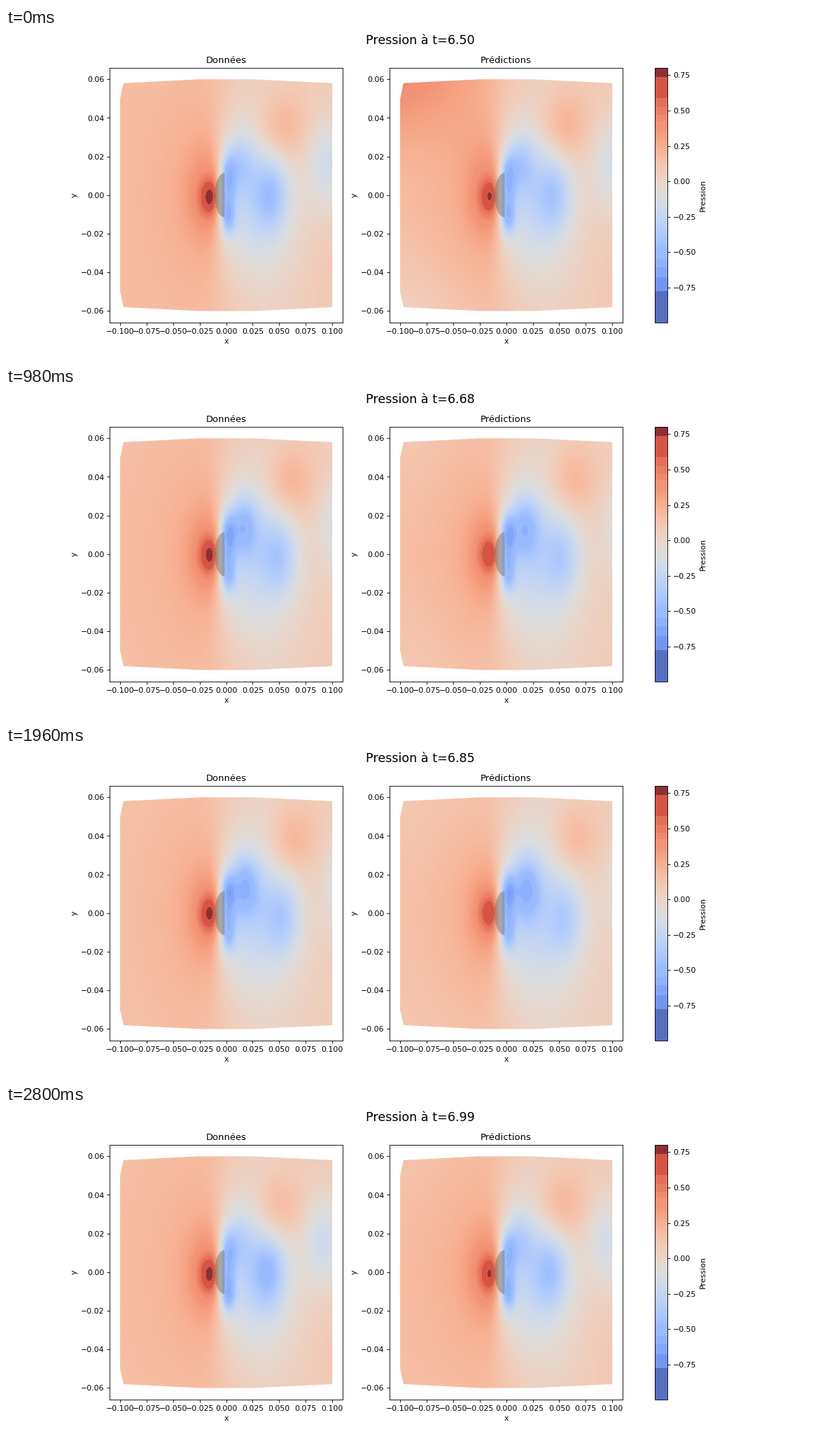
Recreate the animation shown at these times as a matplotlib script. Size 1183 by 473 pixels, loop 2940 ms.

```python
import numpy as np
import matplotlib.pyplot as plt
from matplotlib.animation import FuncAnimation
from matplotlib.colors import ListedColormap
from matplotlib.patches import Polygon

FRAMES, STEP_MS = 21, 140
DPI = 78.87
PERIOD = 0.165                      # vortex shedding period
VMIN, VMAX = -0.997, 0.802
XLIM, YLIM = 0.11, 0.066

gx = (np.arange(333) + 0.5) / 333 * 2 * XLIM - XLIM
gy = (np.arange(364) + 0.5) / 364 * 2 * YLIM - YLIM
X, Y = np.meshgrid(gx, gy)


def gauss(x, y, sx, sy):
    return np.exp(-0.5 * (((X - x) / sx) ** 2 + ((Y - y) / sy) ** 2))


def smooth(u):
    u = np.clip(u, 0, 1)
    return u * u * (3 - 2 * u)


def bump(u, centre, width):
    return np.exp(-((u - centre) / width) ** 2)


def wave(u):
    return np.cos(2 * np.pi * u)


# Steady parts of the flow; BEHIND switches from the front to the wake side
BEHIND = 1 / (1 + np.exp(-(X + 0.008) / (0.0018 + 0.09 * np.abs(Y))))
AMBIENT = 0.13 - 0.06 * smooth((X + 0.01) / 0.06)
HALO = 0.20 * gauss(-0.015, 0, 0.016, 0.017) + 0.09 * gauss(-0.02, 0, 0.04, 0.04)
WAKE = (0.26 * gauss(0.020, 0, 0.028, 0.026) + 0.12 * gauss(0.027, 0, 0.041, 0.06)
        + 0.30 * gauss(0.001, 0, 0.005, 0.010))
INLET = np.clip(-X / 0.1, 0, 1)


def vortex(age, side):
    """Low-pressure core: rolls up at the edge, crosses the axis, drifts away."""
    x = 0.011 + 0.04 * age + 0.045 * age ** 2
    y = side * (0.008 + 0.008 * wave(age))
    depth = 0.25 * smooth((age + 0.25) / 0.35) + 0.22 * bump(age, 0.24, 0.17)
    grow = max(age, 0)
    return depth * gauss(x, y, 0.010 + 0.003 * grow, 0.0105 + 0.006 * grow)


def ridge(age, side):
    """High-pressure patch riding outside the vortex street."""
    x = 0.051 + 0.085 * age
    y = side * (0.040 - 0.006 * np.exp(-6 * age))
    return 0.23 * bump(age, 0.03, 0.27) * gauss(x, y, 0.016, 0.013)


def pressure(phase, nose=0.37, gain=1.0):
    ambient = AMBIENT + 0.035 * wave(2 * (phase - 0.03))
    tip = -0.0015 * wave(phase - 0.9)
    front = HALO + nose * gauss(-0.0142, tip, 0.0075, 0.0065)
    wake = -WAKE
    for side in (1, -1):
        start = (phase - (side < 0) * 0.5) % 1
        shear = 0.25 + 0.12 * wave(start - 0.35)
        wake = wake - shear * gauss(0.001, side * 0.0125, 0.0048, 0.006)
        for age in (start - 1, start, start + 1):
            wake = wake - gain * vortex(age, side) + ridge(age, side)
    return ambient + front * (1 - BEHIND) + wake * BEHIND


def prediction(k, phase):
    """Slightly early and weaker, with an inlet error that dies out."""
    top = 0.34 * np.exp(-k) - 0.04
    bottom = -0.15 * np.exp(-k / 8) * wave(phase)
    up, down = np.clip(Y / 0.06, 0, 1), np.clip(-Y / 0.06, 0, 1)
    corner = INLET * (top * up ** 1.5 + bottom * down ** 1.5)
    return pressure(phase + 0.03, nose=0.32, gain=0.92) + corner


def stepped_coolwarm():
    """Coolwarm, smooth in the middle and stepped towards both ends."""
    v = np.linspace(VMIN, VMAX, 360)
    shown = v.copy()
    cold = [-0.78, -0.68, -0.61, -0.55, -0.49]
    warm = [0.38, 0.43, 0.475, 0.525, 0.59, 0.74]
    for edges in (cold, warm):
        for a, b in zip(edges, edges[1:]):
            shown[(v >= a) & (v < b)] = 0.93 * (a + b) / 2
    rgba = plt.cm.coolwarm((shown - VMIN) / (VMAX - VMIN))
    rgba[v < cold[0], :3] = 0.34, 0.435, 0.755
    rgba[v >= warm[-1], :3] = 0.55, 0.19, 0.21
    return ListedColormap(rgba)


plt.rcParams["font.family"] = "DejaVu Sans"
fig, axes = plt.subplots(1, 2, figsize=(1183.01 / DPI, 473.01 / DPI), dpi=DPI)
title = fig.suptitle("", fontsize=16)

half = [(-0.1, 0.05), (-0.0968, 0.058), (-0.025, 0.06), (0.025, 0.06), (0.1, 0.058)]
domain = half + [(x, -y) for x, y in half[::-1]]
arc = np.linspace(np.pi / 2, 3 * np.pi / 2, 13)
body = np.column_stack([-0.0015 + 0.0095 * np.cos(arc), 0.0115 * np.sin(arc)])

cmap = stepped_coolwarm()
images = []
for ax, name in zip(axes, ("Données", "Prédictions")):
    im = ax.imshow(np.zeros_like(X), extent=(-XLIM, XLIM, -YLIM, YLIM), origin="lower",
                   aspect="auto", vmin=VMIN, vmax=VMAX, cmap=cmap,
                   interpolation="nearest")
    im.set_clip_path(Polygon(domain, transform=ax.transData))
    ax.add_patch(Polygon(body, facecolor="0.45", edgecolor="none", alpha=0.5))
    ax.set(title=name, xlabel="x", ylabel="y", xlim=(-XLIM, XLIM), ylim=(-YLIM, YLIM),
           xticks=np.arange(-4, 5) * 0.025, yticks=np.arange(-3, 4) * 0.02)
    images.append(im)

fig.colorbar(images[0], ax=list(axes), label="Pression", ticks=np.arange(-3, 4) * 0.25)


def update(k):
    t = 6.5 + min(round(2.5 * k), 49) / 100
    phase = (t - 6.5) / PERIOD
    images[0].set_data(pressure(phase))
    images[1].set_data(prediction(k, phase))
    title.set_text(f"Pression à t={t:.2f}")
    return [*images, title]


anim = FuncAnimation(fig, update, frames=FRAMES, interval=STEP_MS, repeat=True,
                     repeat_delay=0, blit=False)
plt.show()
```
